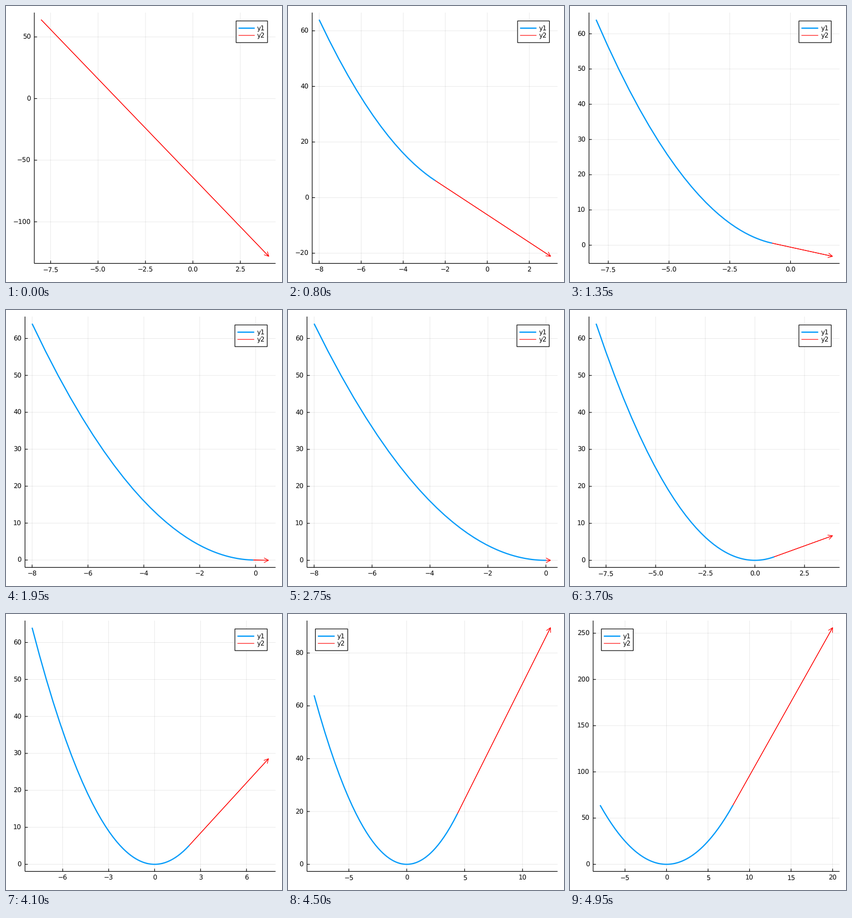
Recreate the animation shown at these times as a matplotlib script. Size 499 by 499 pixels, loop 5 s.

```python
import math

import matplotlib
import matplotlib.pyplot as plt
import numpy as np
from matplotlib.animation import FuncAnimation
from matplotlib.patches import Rectangle

SIZE, DPI, FRAMES = 499, 64, 100
TOP, BOTTOM, RIGHT = 11.9, 465.4, 487.4
EM = 11.7
BLUE, RED = "#009AFA", "#FF0000"
# Tick step mantissas and how nice each one is
STEPS = [(1, 1.0), (5, 0.9), (2, 0.7), (2.5, 0.5), (3, 0.2)]

matplotlib.rcParams["font.family"] = "DejaVu Sans"
matplotlib.rcParams["text.hinting"] = "none"

fig = plt.figure(figsize=(SIZE / DPI, SIZE / DPI), dpi=DPI, facecolor="white")
ax = fig.add_axes([0, 0, 1, 1])
ax.set_xlim(0, SIZE)
ax.set_ylim(SIZE, 0)
ax.axis("off")

times = np.linspace(-2, 2, FRAMES)
curve_x, curve_y = times**3, times**6
artists = []


def points(px):
    return px * 72 / DPI


def line(xs, ys, color="black", width=1.15, alpha=1, z=2):
    artists.extend(ax.plot(xs, ys, color=color, lw=points(width), alpha=alpha,
                           zorder=z, snap=False, solid_capstyle="butt"))


def text(x, y, label, align, z=2):
    # y is the middle of the digits
    artists.append(ax.text(x, y + 0.365 * EM, label, ha=align, va="baseline",
                           fontsize=points(EM), zorder=z))


def widened(values):
    lo, hi = min(values), max(values)
    pad = 0.03 * (hi - lo)
    return lo - pad, hi + pad


def find_ticks(lo, hi):
    """Pick the step with the best mix of count, coverage and niceness."""
    best = (-1, 1, [])
    for power in range(-1, 3):
        for mantissa, nice in STEPS:
            step = mantissa * 10**power
            first, last = math.ceil(lo / step), math.floor(hi / step)
            count = last - first + 1
            if not 4 <= count <= 8:
                continue
            amount = 1 - abs(count - 5) / 5
            cover = 1.5 * (hi - lo) / ((count - 1) * step)
            score = amount / 4 + cover / 3 + nice / 4
            if score > best[0]:
                best = (score, step, [i * step for i in range(first, last + 1)])
    _, step, values = best
    digits = 0 if step == int(step) else 1
    return [(v, f"{v:.{digits}f}".replace("-", "\u2212")) for v in values]


def label_width(label):
    return EM * sum(0.8 if c == "\u2212" else 0.636 for c in label)


def legend_corner(xs, ys, xlim, ylim):
    """Return (right, top) flags of the first corner free of data points."""
    u = (xs - xlim[0]) / (xlim[1] - xlim[0])
    v = (ys - ylim[0]) / (ylim[1] - ylim[0])
    for right, top in ((1, 1), (0, 1), (1, 0)):
        near_x = u >= 0.75 if right else u <= 0.25
        near_y = v >= 0.75 if top else v <= 0.25
        if not np.any(near_x & near_y):
            return right, top
    return 0, 0


def draw_legend(left, corner):
    span = RIGHT - left
    margin, gap, sample = span / 30, 0.0101 * span, 0.067 * span
    width, height, row = 1.228 * EM + 3 * gap + sample, 39.2, 13.07
    x = RIGHT - margin - width if corner[0] else left + margin
    y = TOP + 15.1 if corner[1] else BOTTOM - 15.1 - height
    box = Rectangle((x, y), width, height, facecolor="white", edgecolor="black",
                    lw=points(1.15), zorder=6, snap=False)
    artists.append(ax.add_patch(box))
    entries = (("y1", BLUE, 2.2), ("y2", RED, 1.1))
    for i, (name, color, weight) in enumerate(entries, 1):
        mid = y + i * row
        line([x + gap, x + gap + sample], [mid, mid], color, weight, z=7)
        text(x + 2 * gap + sample, mid, name, "left", z=7)


def draw_arrow(x0, y0, x1, y1):
    for _ in range(2):
        line([x0, x1], [y0, y1], RED, 1.1, z=5)
    dist = math.hypot(x1 - x0, y1 - y0)
    ux, uy = (x1 - x0) / dist, (y1 - y0) / dist
    back, half = 8, 4.2
    xs = [x1 - back * ux - half * uy, x1, x1 - back * ux + half * uy]
    ys = [y1 - back * uy + half * ux, y1, y1 - back * uy - half * ux]
    line(xs, ys, RED, 1.1, z=5)


def draw(frame):
    while artists:
        artists.pop().remove()
    t = times[frame]
    xs, ys = curve_x[:frame + 1], curve_y[:frame + 1]
    # The arrow is the velocity, attached at the current position
    tip_x, tip_y = t**3 + 3 * t**2, t**6 + 6 * t**5
    all_x, all_y = np.append(xs, tip_x), np.append(ys, tip_y)
    xlim, ylim = widened(all_x), widened(all_y)
    xticks, yticks = find_ticks(*xlim), find_ticks(*ylim)
    left = 19.5 + max(label_width(label) for _, label in yticks)

    def to_x(v):
        return left + (v - xlim[0]) / (xlim[1] - xlim[0]) * (RIGHT - left)

    def to_y(v):
        return BOTTOM - (v - ylim[0]) / (ylim[1] - ylim[0]) * (BOTTOM - TOP)

    for value, label in xticks:
        x = to_x(value)
        line([x, x], [TOP, BOTTOM], width=0.8, alpha=0.1, z=1)
        line([x, x], [BOTTOM, BOTTOM - 5], width=1.1)
        text(x, 476.2, label, "center")
    for value, label in yticks:
        y = to_y(value)
        line([left, RIGHT], [y, y], width=0.8, alpha=0.1, z=1)
        line([left, left + 5], [y, y], width=1.1)
        text(left - 6.3, y, label, "right")
    line([left, RIGHT], [BOTTOM, BOTTOM])
    line([left, left], [TOP, BOTTOM])

    line(to_x(xs), to_y(ys), BLUE, 2.2, z=4)
    draw_arrow(to_x(t**3), to_y(t**6), to_x(tip_x), to_y(tip_y))
    draw_legend(left, legend_corner(all_x, all_y, xlim, ylim))
    return artists


anim = FuncAnimation(fig, draw, frames=FRAMES, interval=50, repeat=True,
                     repeat_delay=0, blit=False)
plt.show()
```
